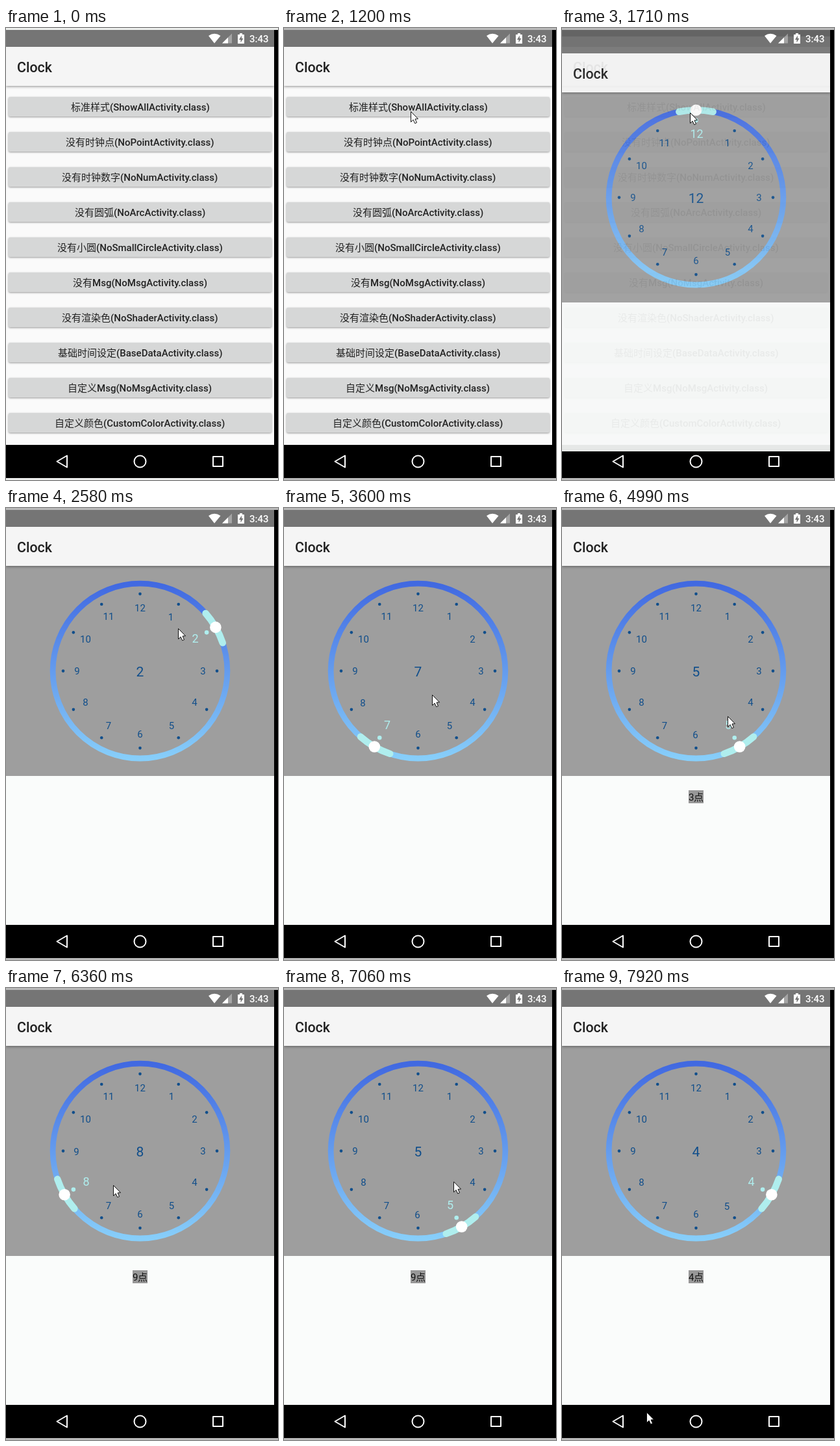
Recreate the animation shown at these times as an HTML page with a canvas. Size 419 by 695 pixels, loop 8000 ms.

```html
<!DOCTYPE html>
<html lang="zh">
<head>
<meta charset="utf-8">
<style>
  html, body { margin: 0; width: 100%; height: 100%; overflow: hidden; background: #000; }
  canvas { display: block; }
</style>
</head>
<body>
<canvas id="stage" width="419" height="695"></canvas>
<script>
const screen2d = document.getElementById('stage').getContext('2d');
const page2d = new OffscreenCanvas(419, 695).getContext('2d');
let g = screen2d;

const LOOP = 8000, STEP = 172, LEAD = 12, OPEN = 10;
const LATIN = 'Roboto, sans-serif', CJK = '"Noto Sans CJK SC", "Noto Sans CJK", sans-serif';
const CX = 206.5, CY = 250.6, RING = 134.4;
const INK = '#104e8b', GLOW = '#afeeee';

const buttons = [
  ['标准样式', '(ShowAllActivity.class)'],
  ['没有时钟点', '(NoPointActivity.class)'],
  ['没有时钟数字', '(NoNumActivity.class)'],
  ['没有圆弧', '(NoArcActivity.class)'],
  ['没有小圆', '(NoSmallCircleActivity.class)'],
  ['没有', 'Msg(NoMsgActivity.class)'],
  ['没有渲染色', '(NoShaderActivity.class)'],
  ['基础时间设定', '(BaseDataActivity.class)'],
  ['自定义', 'Msg(NoMsgActivity.class)'],
  ['自定义颜色', '(CustomColorActivity.class)']
];

// Turning points of the dragged hour: step, hour (14 is 2 after a full turn)
const drag = [
  [12, 12], [15, 14], [21, 7], [23, 4], [26, 1], [28, 6], [29, 5], [30, 5], [33, 10], [37, 8], [42, 4]
];

// Turning points of the mouse pointer: step, x, y
const pointer = [
  [1, 294, 530], [5, 191, 133], [7, 195, 128], [10, 197, 130], [15, 265, 185], [18, 165, 170],
  [21, 228, 287], [24, 290, 250], [26, 255, 175], [29, 255, 320], [33, 120, 212],
  [37, 165, 303], [42, 285, 296], [44, 204, 467], [46, 130, 652]
];

// Linear value of one column of a key list
function track(keys, step, col = 1) {
  const i = keys.findIndex(k => k[0] >= step);
  if (i < 1) return keys.at(i)[col];
  const a = keys[i - 1], b = keys[i];
  return a[col] + (b[col] - a[col]) * (step - a[0]) / (b[0] - a[0]);
}

const hourAt = step => (Math.ceil(track(drag, step) - 0.5) + 11) % 12 + 1;

function previousHour(step) {
  const hour = hourAt(step);
  while (step > OPEN && hourAt(step) === hour) step--;
  return hourAt(step);
}

function box(x, y, w, h, color) {
  g.fillStyle = color;
  g.fillRect(x, y, w, h);
}

function poly(points, color) {
  g.beginPath();
  for (let i = 0; i < points.length; i += 2) g.lineTo(points[i], points[i + 1]);
  g.closePath();
  g.fillStyle = color;
  g.fill();
}

function disc(x, y, r, color) {
  g.beginPath();
  g.arc(x, y, r, 0, 7);
  g.fillStyle = color;
  g.fill();
}

function text(s, x, y, font, color, align = 'left') {
  g.font = font;
  g.fillStyle = color;
  g.textAlign = align;
  g.fillText(s, x, y);
}

function number(n, x, y, size, color) {
  text(n, x, y + size * 0.355, `${size}px ${LATIN}`, color, 'center');
}

function shadow(color, blur, dy) {
  g.shadowColor = color;
  g.shadowBlur = blur;
  g.shadowOffsetY = dy;
}

function appBar() {
  shadow('rgba(0,0,0,.45)', 4, 1);
  box(0, 29, 413, 60, '#f5f5f5');
  shadow('transparent', 0, 0);
  box(0, 3, 413, 26, '#757575');
  text('Clock', 17, 68, `500 21.4px ${LATIN}`, '#212121');
}

function drawList() {
  box(0, 3, 413, 638, '#fafafa');
  appBar();
  buttons.forEach(([zh, code], i) => {
    const y = 106 + i * 54, font = `500 15px ${LATIN}`, zhWidth = zh.length * 15;
    shadow('rgba(0,0,0,.4)', 3, 1);
    g.beginPath();
    g.roundRect(4, y, 405, 30, 2);
    g.fillStyle = '#d6d7d7';
    g.fill();
    shadow('transparent', 0, 0);
    g.font = font;
    const x = Math.round(CX - (g.measureText(code).width + zhWidth) / 2);
    text(zh, x, y + 21, `15px ${CJK}`, '#222');
    text(code, x + zhWidth, y + 21, font, '#222');
  });
}

function ringArc(from, to, width, color) {
  g.beginPath();
  g.arc(CX, CY, RING, from, to);
  g.lineWidth = width;
  g.strokeStyle = color;
  g.stroke();
}

function drawClock(step) {
  const hour = hourAt(step), last = previousHour(step);
  box(0, 3, 413, 638, '#fafcfb');
  box(0, 89, 413, 323, '#9e9e9e');
  appBar();

  const shade = g.createLinearGradient(0, CY - RING, 0, CY + RING);
  shade.addColorStop(0, '#4169e1');
  shade.addColorStop(1, '#87cefa');
  ringArc(0, Math.PI * 2, 8.8, shade);

  for (let h = 1; h <= 12; h++) {
    const a = h * Math.PI / 6, sx = Math.sin(a), sy = -Math.cos(a);
    const on = h === hour, color = on ? GLOW : INK;
    const nudge = on ? 1 : h === last ? -1 : 0;
    disc(CX + sx * 118.5, CY + sy * 118.5, on ? 3.3 : 2.3, color);
    number(h, CX + sx * 97 + nudge, CY + sy * 97 - nudge, on ? 18 : 15, color);
  }

  const a = (hour / 6 - 0.5) * Math.PI;
  g.lineCap = 'round';
  ringArc(a - 0.196, a + 0.196, 10.5, GLOW);
  disc(CX + Math.cos(a) * RING, CY + Math.sin(a) * RING, 8.8, '#fff');
  number(hour, CX, 252, 21, INK);

  const picked = step >= 42 ? 4 : step >= 35 ? 9 : step >= 27 ? 3 : 0;
  if (picked) {
    box(195, 434, 23, 20, '#989898');
    text(picked, 195, 450, `15px ${LATIN}`, '#111');
    text('点', 203, 450, `15px ${CJK}`, '#111');
  }
}

function systemIcons() {
  g.beginPath();
  g.moveTo(321, 23.5);
  g.lineTo(312, 12);
  g.quadraticCurveTo(321, 5.5, 330.5, 12);
  g.fillStyle = '#fff';
  g.fill();
  poly([348, 8.5, 348, 23.5, 333, 23.5], 'rgba(255,255,255,.35)');
  poly([342, 14.5, 342, 23.5, 333, 23.5], '#fff');
  box(357, 10, 10, 14, '#fff');
  box(360, 8, 4, 2, '#fff');
  poly([363, 11.5, 359, 18, 361.5, 18, 361.5, 22.5, 365.5, 16, 363, 16], '#757575');
  text('3:43', 375, 22, `500 15px ${LATIN}`, '#fff');

  g.strokeStyle = '#fff';
  g.lineWidth = 2;
  g.lineJoin = 'round';
  poly([78.5, 666.5, 94, 657.5, 94, 675.5], 'transparent');
  g.stroke();
  g.beginPath();
  g.arc(206.5, 666.5, 9, 0, 7);
  g.stroke();
  g.strokeRect(319, 659, 15, 15);
}

function drawPointer(step) {
  g.save();
  g.translate(track(pointer, step) + 0.5, track(pointer, step, 2) + 0.5);
  poly([0, 0, 0, 16, 3.6, 12.6, 6.2, 18.2, 9, 17, 6.5, 11.5, 11, 11.2], '#fff');
  g.strokeStyle = '#111';
  g.lineWidth = 1;
  g.lineJoin = 'miter';
  g.stroke();
  g.restore();
}

function draw(t) {
  const step = Math.floor((t + LEAD) / STEP), opening = step === OPEN;
  box(0, 0, 419, 695, step < 7 ? '#eceeec' : '#b9b9b9');
  box(0, 3, 419, 689, '#000');

  if (step <= OPEN) drawList();
  if (step >= OPEN) {
    if (opening) box(0, 3, 413, 638, 'rgba(0,0,0,.15)');
    g = page2d;
    drawClock(step);
    g = screen2d;
    g.globalAlpha = opening ? 0.92 : 1;
    g.drawImage(page2d.canvas, 0, opening ? 10 : 0);
    g.globalAlpha = 1;
  }
  systemIcons();
  if (step > 0) drawPointer(step);
}

const start = performance.now();
function tick() {
  draw((performance.now() - start) % LOOP);
  requestAnimationFrame(tick);
}
tick();
</script>
</body>
</html>
```
